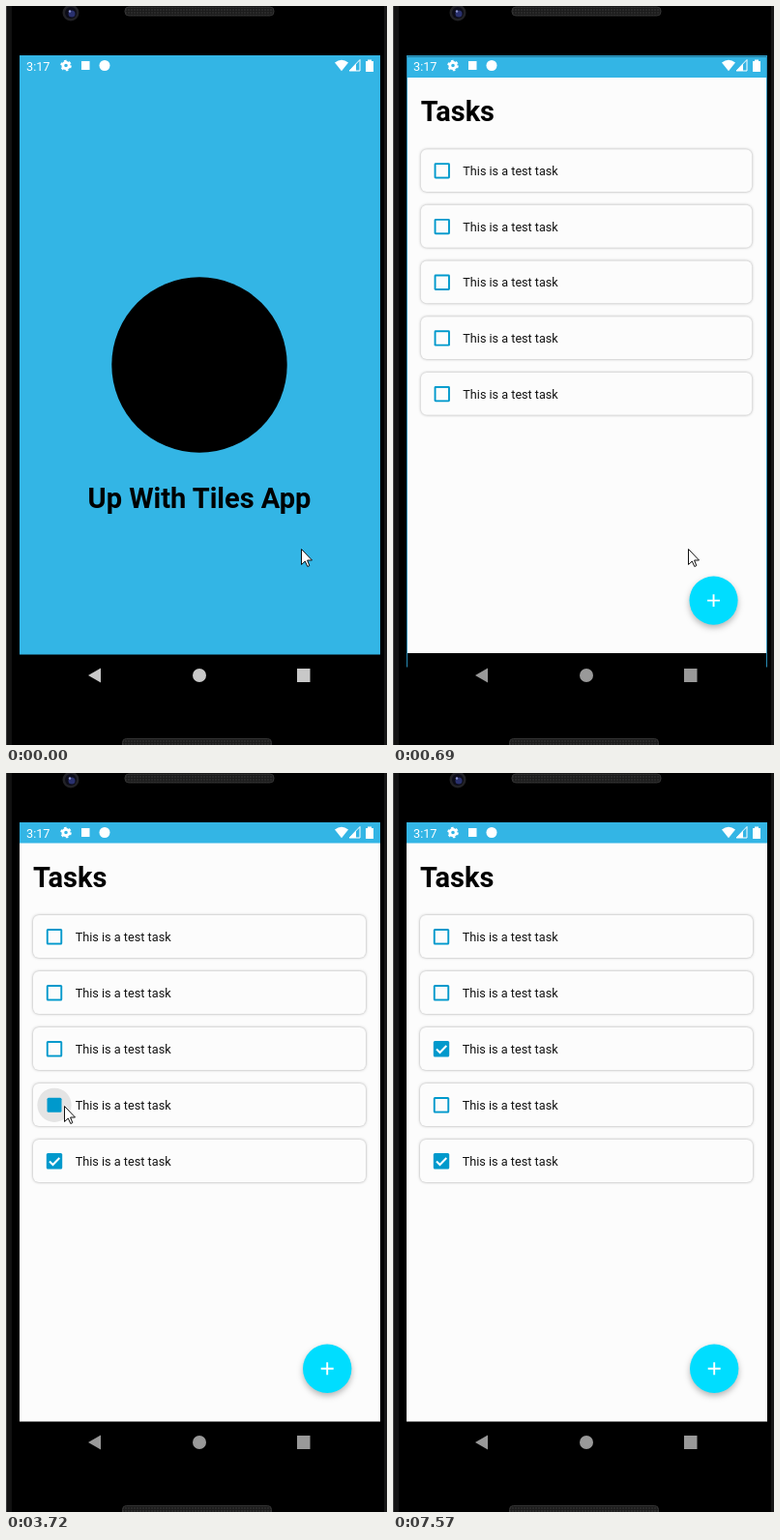
An HTML page for the animation above (8 s loop, 394 by 764 pixels).

```html
<!DOCTYPE html>
<html lang="en">
<head>
<meta charset="utf-8">
<style>
  html, body { margin: 0; width: 100%; height: 100%; overflow: hidden; background: #000; }
  svg { display: block; width: 394px; height: 764px; font-family: Roboto, sans-serif; }
  .card { fill: #fcfcfc; filter: drop-shadow(0 .8px 1.5px rgba(0, 0, 0, .35)); }
  .fab { fill: #00ddff; filter: drop-shadow(0 3px 3px rgba(0, 0, 0, .28)); }
  .heading { font-size: 29px; font-weight: 700; }
  .label { font-size: 12.7px; fill: #111; }
</style>
</head>
<body>
<svg viewBox="0 0 394 764">
  <defs>
    <pattern id="mesh" width="3" height="3" patternUnits="userSpaceOnUse">
      <rect width="3" height="3" fill="#1c1c1c"/>
      <circle cx="1" cy="1" r=".8" fill="#383838"/>
    </pattern>
  </defs>

  <!-- phone body -->
  <rect width="394" height="764"/>
  <rect width="6" height="764" fill="#111"/>
  <rect width="1" height="764" fill="#3c3c3c"/>
  <rect x="391" width="3" height="764" fill="#161616"/>
  <rect x="123" y="1" width="154" height="9" rx="4" fill="url(#mesh)" stroke="#333"/>
  <rect x="120.5" y="757.5" width="154" height="12" rx="4" fill="url(#mesh)" stroke="#333"/>
  <circle cx="67" cy="7" r="8.5" fill="#222226"/>
  <circle cx="67" cy="7" r="6" fill="#0c0c18"/>
  <circle cx="68" cy="8" r="3.5" fill="#29306e"/>
  <circle cx="66" cy="5.5" r="1.2" fill="#8c94d0"/>

  <g id="splash">
    <rect x="14" y="51" width="373" height="619.5" fill="#33b5e5"/>
    <circle cx="200" cy="371" r="90.7"/>
    <text class="heading" x="200" y="519" text-anchor="middle">Up With Tiles App</text>
  </g>

  <g id="app">
    <rect x="14" y="51" width="373" height="632.5" fill="#2b97c2"/>
    <g id="window">
      <rect x="14" y="51" width="373" height="663"/>
      <rect x="14" y="51" width="373" height="23" fill="#33b5e5"/>
      <rect x="14" y="72.5" width="373" height="598" fill="#fcfcfc"/>
      <text class="heading" x="28" y="118">Tasks</text>
      <g id="rows"></g>
      <circle class="fab" cx="332.2" cy="615.8" r="25.2"/>
      <path d="M325.7 615.8h13M332.2 609.300v13" stroke="#fff" stroke-width="1.9"/>
    </g>
  </g>

  <!-- status bar -->
  <g fill="#fff">
    <text x="21" y="66.5" font-size="12.7">3:17</text>
    <g fill="none" stroke="#fff">
      <circle cx="62" cy="61.5" r="3.2" stroke-width="2.8"/>
      <circle cx="62" cy="61.5" r="5" stroke-width="1.6" stroke-dasharray="2.618"/>
    </g>
    <rect x="78" y="57" width="8.5" height="9"/>
    <circle cx="102" cy="61.5" r="5.5"/>
    <path d="M340 58.5Q347 53 354 58.5L347 67.3Z"/>
    <path d="M355 67L366 55.5V67Z" fill="none" stroke="#fff"/>
    <path d="M355 67L362 59.5V67Z"/>
    <path d="M372 57h2v-1.5h4V57h2v11h-8Z"/>
  </g>

  <g id="nav">
    <path d="M85 692L98 684.5V699.5Z"/>
    <circle cx="200" cy="692" r="7"/>
    <rect x="301" y="685" width="13.5" height="14"/>
  </g>

  <path id="cursor" d="M.5 .5V16.5L4.3 13L6.8 18.5L8.8 17.6L6.6 12H11.5Z" fill="#fff" stroke="#111"/>
</svg>

<script>
const LOOP = 8000, FRAME = 130;
const OPEN_AT = 570, CURSOR_GONE = 7570;
const HOME = [305, 561];
const $ = id => document.getElementById(id);

// Pointer strokes: start time, number of frames, destination.
const glides = [
  { at: 1360, frames: 2, to: [111, 414] },
  { at: 1640, frames: 3, to: [51, 397] },
  { at: 2670, frames: 2, to: [38, 333] },
  { at: 2940, frames: 2, to: [60, 344] },
  { at: 3850, frames: 3, to: [58, 297] },
  { at: 4550, frames: 1, to: [326, 610] },
  { at: 5970, frames: 1, to: [48, 463] },
  { at: 6240, frames: 2, to: [309, 584] },
  { at: 6510, frames: 4, to: [199, 87] },
  { at: 7050, frames: 2, to: [246, 552] },
  { at: 7300, frames: 2, to: [183, 708] }
];

// Each tap toggles its row; the ripple lasts while it is held.
const taps = [
  { row: 4, at: 2220, hold: 450 },
  { row: 3, at: 3300, hold: 270 },
  { row: 3, at: 3570, hold: 270 },
  { row: 2, at: 4430, hold: 120 }
];

const clamp = u => Math.min(1, Math.max(0, u));
const easeOut = u => u * (2 - u);
const mix = (a, b, u) => a + (b - a) * u;
const stepped = (t, start, frames) => clamp((Math.floor((t - start) / FRAME) + 1) / frames);

function setAttrs(node, attrs) {
  for (const name in attrs) node.setAttribute(name, attrs[name]);
}

function square(node, half) {
  setAttrs(node, { x: 50 - half, y: 169.3 - half, width: 2 * half, height: 2 * half });
}

const rows = Array.from({ length: 5 }, (_, i) => {
  $('rows').insertAdjacentHTML('beforeend', `
    <g transform="translate(0 ${i * 58})">
      <rect class="card" x="28" y="147" width="344" height="44" rx="6"/>
      <circle class="ripple" cx="50" cy="169.3" fill="#e4e4e4"/>
      <rect class="box" rx="1.5" fill="#0099cc"/>
      <rect class="hole" fill="#fcfcfc"/>
      <path class="tick" d="M45 169.5L48.5 173L55.3 166" fill="none" stroke="#fff" stroke-width="2"/>
      <text class="label" x="71.7" y="174">This is a test task</text>
    </g>`);
  const [, ripple, box, hole, tick] = $('rows').lastElementChild.children;
  return { ripple, box, hole, tick, taps: taps.filter(tap => tap.row === i) };
});

function drawRow({ ripple, box, hole, tick, taps }, t) {
  let level = 0, radius = 0;
  taps.forEach(({ at, hold }, i) => {
    const change = stepped(t, at + FRAME, 2);
    level += i % 2 ? -change : change;
    if (t >= at && t < at + hold) radius = mix(16, 18, easeOut((t - at) / hold));
  });
  square(box, level === .5 ? 7.5 : 8.2);
  square(hole, 6.3 * clamp(1 - 2 * level));
  tick.style.opacity = level === 1 ? 1 : 0;
  ripple.setAttribute('r', radius);
}

function cursorAt(t) {
  return glides.reduce(([x, y], { at, frames, to }) => {
    const u = easeOut(stepped(t, at, frames));
    return [mix(x, to[0], u), mix(y, to[1], u)];
  }, HOME);
}

function draw(t) {
  const opened = t >= OPEN_AT;
  $('splash').style.display = opened ? 'none' : '';
  $('app').style.display = opened ? '' : 'none';

  const zoom = mix(.98, 1, easeOut(stepped(t, OPEN_AT + FRAME - 10, 2)));
  $('window').setAttribute('transform', `translate(200.5 376) scale(${zoom}) translate(-200.5 -376)`);

  const grey = mix(200, 153, clamp(t / 430));
  $('nav').setAttribute('fill', `rgb(${grey} ${grey} ${grey})`);

  $('cursor').setAttribute('transform', `translate(${cursorAt(t)})`);
  $('cursor').style.display = t < CURSOR_GONE ? '' : 'none';
  rows.forEach(row => drawRow(row, t));
}

const start = performance.now();
function animate() {
  draw((performance.now() - start) % LOOP);
  requestAnimationFrame(animate);
}
animate();
</script>
</body>
</html>
```
